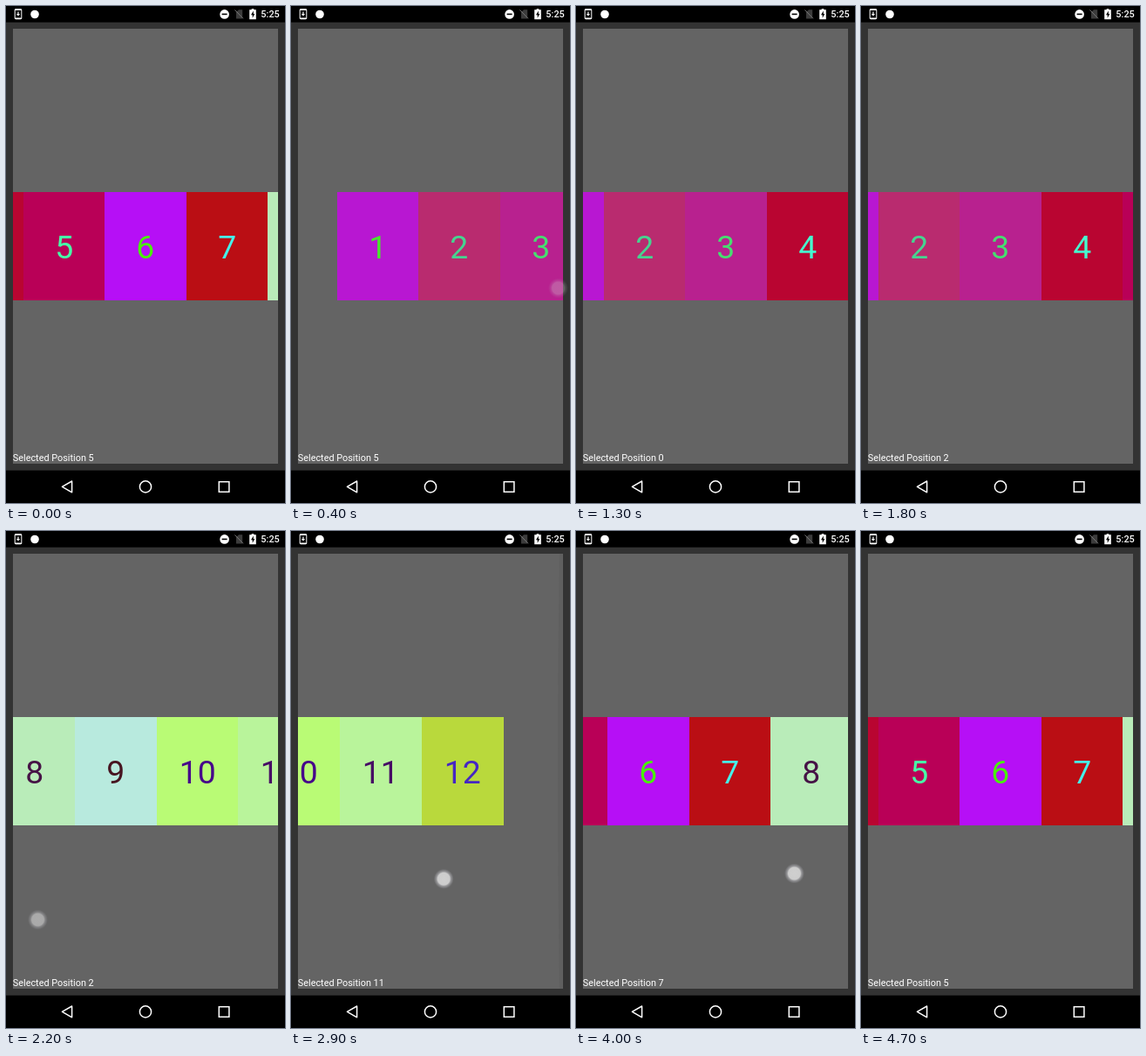
Animation of 320 by 569 pixels, one loop 4.8 s. Source, as an HTML page:

```html
<!DOCTYPE html>
<html lang="en">
<head>
<meta charset="utf-8">
<title>Snapping picker</title>
<style>
  html, body { margin: 0; width: 100%; height: 100%; overflow: hidden; background: #333; }
  svg { display: block; width: 320px; height: 569px; }
  text { font-family: Roboto, "Noto Sans", sans-serif; }
  .num { font-size: 37.33px; text-anchor: middle; }
  .label { font-size: 10.89px; fill: #fff; }
  .clock { font-size: 10.89px; font-weight: 500; fill: #fff; text-anchor: end; }
  .line { fill: none; stroke: #fff; stroke-width: 1.5; }
</style>
</head>
<body>
<svg viewBox="0 0 320 569">
  <defs>
    <clipPath id="stage"><rect x="8" y="26" width="304" height="498"/></clipPath>
    <radialGradient id="dot">
      <stop offset="0" stop-color="#cfcfcf"/>
      <stop offset=".6" stop-color="#ccc"/>
      <stop offset=".72" stop-color="#c4c4c8" stop-opacity=".55"/>
      <stop offset="1" stop-color="#aaaab4" stop-opacity="0"/>
    </radialGradient>
  </defs>

  <rect width="320" height="569" fill="#333"/>
  <rect x="8" y="26" width="304" height="498" fill="#646464"/>
  <g clip-path="url(#stage)">
    <g id="cells"></g>
    <path id="glowLeft" d="M8 26H12Q16 275 12 524H8Z" fill="#333"/>
    <path id="glowRight" d="M312 26H308Q304 275 308 524H312Z" fill="#333"/>
  </g>
  <text id="label" class="label" x="7.78" y="520.9"></text>

  <!-- status bar -->
  <rect width="320" height="18.67" fill="#000"/>
  <rect x="10.2" y="3.8" width="7.6" height="11" rx="1" class="line" style="stroke-width:1"/>
  <path d="M10 4.3h8M10 14.3h8" class="line"/>
  <path d="M13.4 6.5h1.2v2.6h1.5l-2.1 2.3-2.1-2.3h1.5z" fill="#fff"/>
  <circle cx="33" cy="9.5" r="4.8" fill="#fff"/>
  <circle cx="250.6" cy="9.4" r="5.3" fill="#fff"/>
  <path d="M247.6 9.4h6" stroke="#000" stroke-width="1.6"/>
  <path d="M264 7l3-2.8h4.2v10.2H264z" fill="#3c3c3c"/>
  <path d="M262.5 4.5l9.5 9.8" stroke="#777" stroke-width="1"/>
  <path d="M281.6 4.2v-1h2.8v1h2.4v11h-7.6v-11z" fill="#fff"/>
  <path d="M283.8 5.6l-2.8 4.6h1.7v3.6l2.6-4.8h-1.5z" fill="#000"/>
  <text class="clock" x="313.8" y="13.4">5:25</text>

  <!-- navigation bar -->
  <rect y="531.67" width="320" height="37.33" fill="#000"/>
  <path d="M64.4 550.4L75.6 544V556.8Z" class="line" stroke-linejoin="round"/>
  <circle cx="160" cy="550.4" r="6.6" class="line"/>
  <rect x="244.3" y="544.7" width="11.6" height="11.6" class="line"/>

  <circle id="touch" r="11.5" fill="url(#dot)"/>
</svg>
<script>
const LOOP = 4800, STEP = 100;
const CELL_W = 280 / 3, CELL_H = 124, TOP = 213, FIRST_X = 160 - CELL_W / 2;
const FIRST_INDEX = 5, LAST_INDEX = 11;
const COLORS = [
  0xb817d2, 0xb92b6f, 0xb8218f, 0xb90531, 0xb90057, 0xb60ff6,
  0xba0e14, 0xb9ecb9, 0xb8eade, 0xb9fb75, 0xb9f49b, 0xb9d93c
];

// Each swipe holds the finger down for a while, then flings and snaps to an index.
const SWIPES = [
  { at: 100, hold: 200, span: 474, from: [60, 358], to: [306.5, 323], index: 0 },
  { at: 800, hold: 300, span: 710, from: [262, 398], to: [112, 408], index: 2 },
  { at: 1800, hold: 350, span: 778, from: [280, 410], to: [36.5, 445], index: 11 },
  { at: 2740, hold: 460, span: 1008, from: [125, 398.4], to: [305, 398], index: 7 },
  { at: 3750, hold: 350, span: 561, from: [141, 395], to: [277.5, 391.3], index: 5 }
];

const $ = id => document.getElementById(id);
const hex = n => "#" + n.toString(16).padStart(6, "0");
const clamp = v => Math.min(1, Math.max(0, v));
const mix = (a, b, p) => a + (b - a) * p;
const smooth = u => u * u * (3 - 2 * u);
const fling = u => 1 - (1 - u * u) ** 4;

const cells = COLORS.map((color, i) => {
  const cell = document.createElementNS("http://www.w3.org/2000/svg", "g");
  cell.innerHTML =
    `<rect y="${TOP}" width="${Math.ceil(CELL_W)}" height="${CELL_H}" fill="${hex(color)}"/>
     <text class="num" x="${CELL_W / 2}" y="289.1" fill="${hex(0xffffff - color)}">${i + 1}</text>`;
  return $("cells").appendChild(cell);
});

function draw(t) {
  let position = FIRST_INDEX, selected = FIRST_INDEX;
  let x = 0, y = 0, touch = 0;
  const glow = [0, 0];

  for (const { at, hold, span, from, to, index } of SWIPES) {
    const age = t - at;
    if (age <= 0) break;
    position = mix(position, index, fling(clamp(age / span)));
    if (age >= span) {
      selected = index;
      const fade = .28 * clamp(1 - (age - span) / 500);
      if (index === 0) glow[0] = fade;
      if (index === LAST_INDEX) glow[1] = fade;
    }
    const p = smooth(clamp(age / hold));
    x = mix(from[0], to[0], p);
    y = mix(from[1], to[1], p);
    touch = clamp(1 - (age - hold) / 150);
  }

  cells.forEach((cell, i) => {
    const left = Math.round(FIRST_X + (i - position) * CELL_W);
    cell.setAttribute("transform", `translate(${left} 0)`);
  });
  $("label").textContent = "Selected Position " + selected;
  $("glowLeft").setAttribute("opacity", glow[0]);
  $("glowRight").setAttribute("opacity", glow[1]);
  $("touch").setAttribute("transform", `translate(${x} ${y})`);
  $("touch").setAttribute("opacity", touch);
}

const start = performance.now();
function tick() {
  const t = (performance.now() - start) % LOOP;
  draw(Math.floor(t / STEP) * STEP);
  requestAnimationFrame(tick);
}
tick();
</script>
</body>
</html>
```
